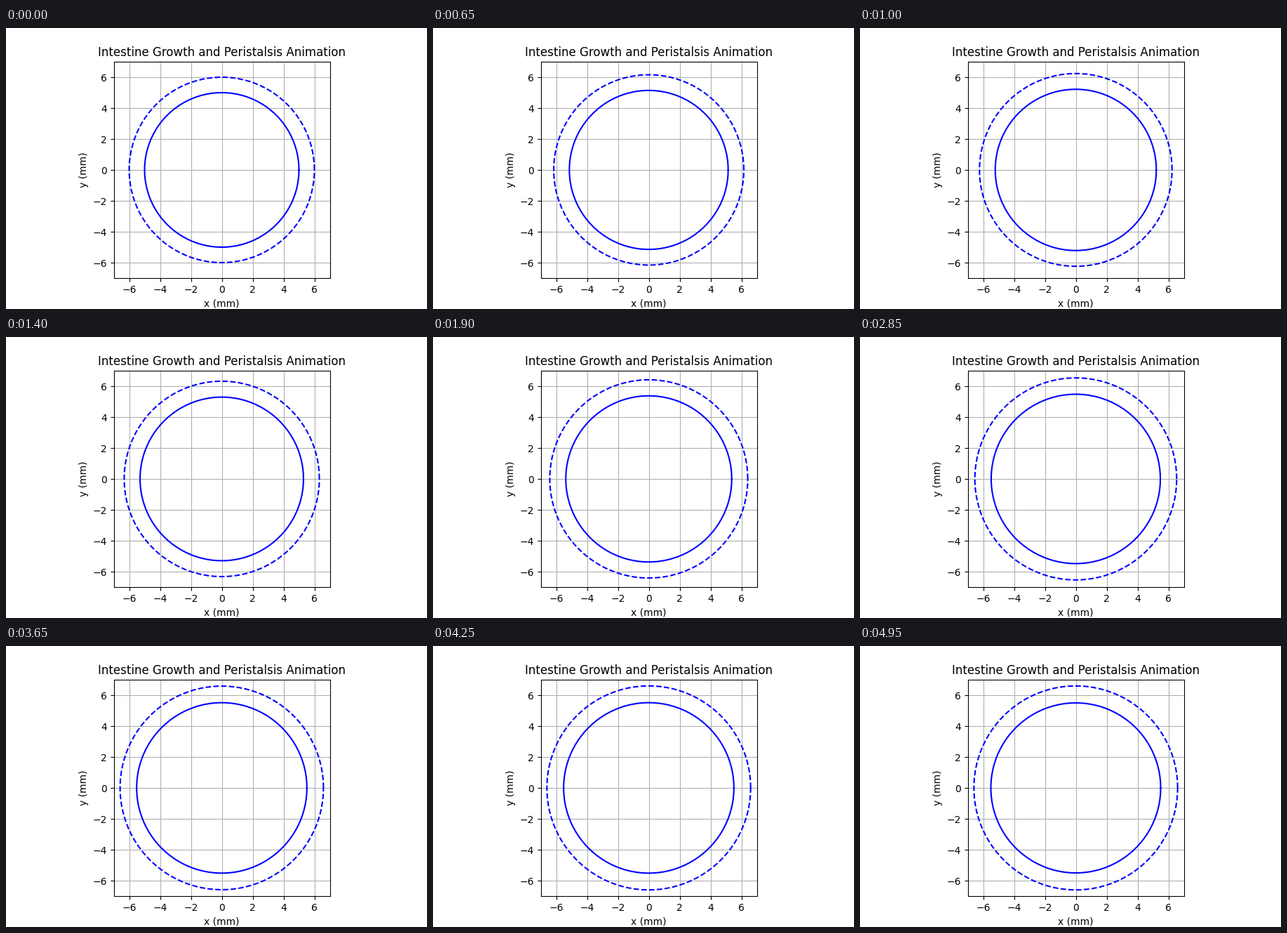
A matplotlib script for the animation above (5 s loop, 600 by 400 pixels).

```python
import numpy as np
import matplotlib.pyplot as plt
from matplotlib.animation import FuncAnimation

FRAMES = 100
INTERVAL = 50          # ms
INNER, OUTER = 5, 6    # starting radii in mm
GROWTH = 0.1           # relative growth over one loop
SQUEEZE = 0.2          # peristaltic amplitude in mm

theta = np.linspace(0, 2 * np.pi, 100)

fig, ax = plt.subplots(figsize=(6, 4), dpi=100)
ax.set_xlim(-7, 7)
ax.set_ylim(-7, 7)
ax.set_aspect("equal")
ax.grid(True)
ax.set_xlabel("x (mm)")
ax.set_ylabel("y (mm)")
ax.set_title("Intestine Growth and Peristalsis Animation")

inner_line, = ax.plot([], [], "b-")
outer_line, = ax.plot([], [], "b--")


def radius(start, t):
    return start * (1 + GROWTH * t) + SQUEEZE * np.sin(np.pi * t)


def update(frame):
    t = frame / FRAMES
    for line, start in ((inner_line, INNER), (outer_line, OUTER)):
        r = radius(start, t)
        line.set_data(r * np.cos(theta), r * np.sin(theta))
    return inner_line, outer_line


anim = FuncAnimation(fig, update, frames=FRAMES, interval=INTERVAL,
                     repeat=True, repeat_delay=0)
plt.show()
```
